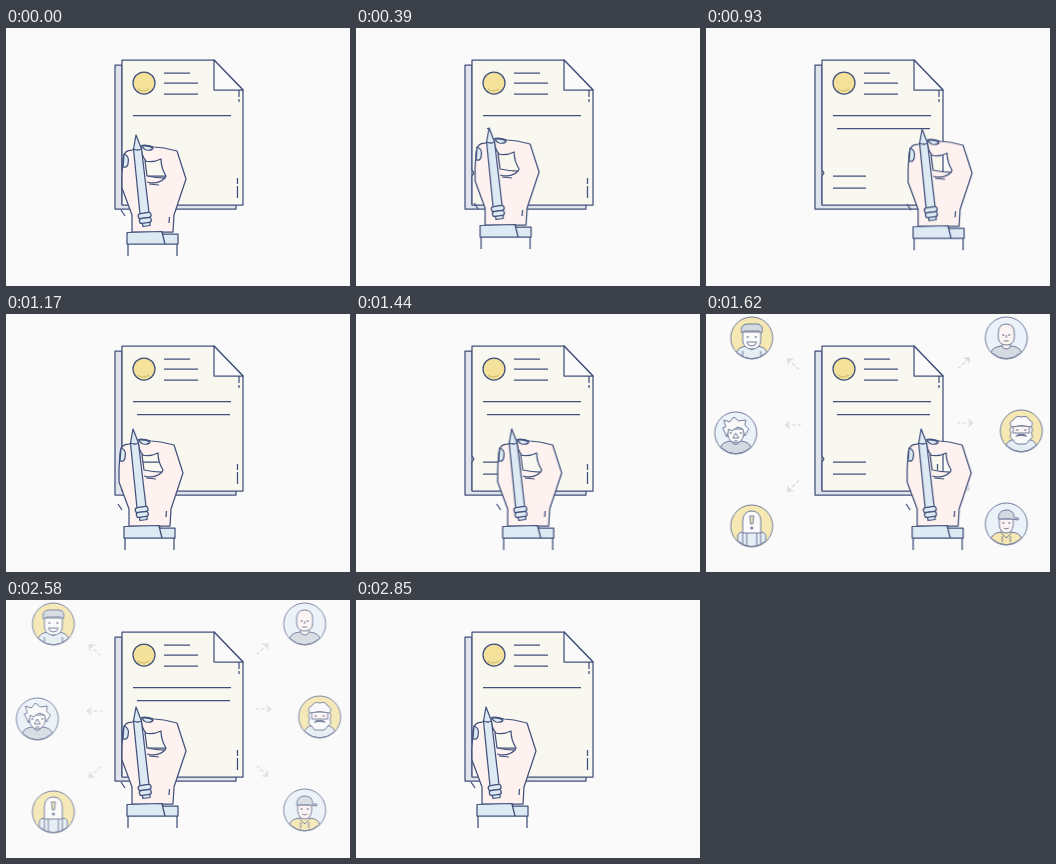
These frames come from a looping animation (344x258 px, 3.6 s). An HTML page:

```html
<!DOCTYPE html>
<html lang="en">
<head>
<meta charset="utf-8">
<title>Signing a document</title>
<style>
  html, body { margin: 0; width: 100%; height: 100%; overflow: hidden; background: #fafafa; }
  svg { display: block; width: 100vw; height: 100vh; }
  .ink { stroke: #42517c; stroke-width: 1.25; stroke-linejoin: round; fill: none; }
  .ink .paper { fill: #f8f8f0; }
  .ink .back { fill: #e1e4ec; }
  .ink .gold { fill: #f5e29a; }
  .ink .blue { fill: #e6eff8; }
  .ink .steel { fill: #deeaf3; }
  .ink .skin { fill: #fdf2ef; }
  .ink .white { fill: #fafafa; }
  .ink .grey { fill: #c9cfda; }
  .ink .dark { fill: #42517c; stroke: none; }
  .thin { stroke-width: 1; }
  .arrow { stroke: #c6c9cf; stroke-width: 1.2; fill: none; }
  .dash { stroke-dasharray: 4 2; }
</style>
</head>
<body>
<svg viewBox="0 0 344 258">
  <g class="ink">
    <path class="back" d="M116 37H109V181H230V176H116Z"/>
    <path class="paper" d="M116 32H208L237 62V177H116V148L118 145L116 142Z"/>
    <path class="white" d="M208 32V62H237Z"/>
    <path d="M233 62V69M233 71V74M231.500 150V156M231.500 158V170"/>
    <circle class="gold" cx="138" cy="55" r="11"/>
    <path class="thin" d="M132 61Q137 65 143 61" stroke="#c9b56d"/>
    <path d="M158 45H184M158 55H192M158 66H192M127 87.500H225M127 148H160M127 160H160"/>
    <path id="line" d="M131 100.500H224" stroke-dasharray="93 100"/>
  </g>

  <g id="left"></g>
  <g id="right"></g>

  <g id="hand" class="ink">
    <path class="skin" fill-rule="evenodd" d="M-4 15C-10 15-12 18-13 24L-14 40V53L-4 80V97H37L38 80L50 44L41 16L28 13L18 12Q8 9 5 11Z
      M9 26Q17 28 25 24Q25 33 30 41L29 43Q20 43 11 41Z"/>
    <path d="M29 43Q22 50 11 47M13 49L23 50M33.500 82L33 88M-15 75L-11 81M5 12Q6 22 10 26"/>
    <path class="steel" d="M6 11Q12 10 17 13Q16 16 10 15Q7 14 6 11Z"/>
    <path class="steel" d="M-12 19Q-6 21-8 29Q-9 33-13 32Z"/>
    <path class="steel" d="M0 0L-2.500 14L4 79L13 77.500L5.500 14Z"/>
    <path d="M-2.500 14Q2 16 5.500 14"/>
    <path class="steel" d="M6 87L7 91.500L14 90.500V86Z"/>
    <g transform="rotate(-8 9 83)">
      <rect class="steel" x="2.500" y="78" width="13" height="5" rx="2.500"/>
      <rect class="steel" x="3" y="83" width="12" height="5" rx="2.500"/>
    </g>
    <path class="white" stroke="none" d="M-8 109H41V121H-8Z"/>
    <path d="M-8 121V109M41 109V121"/>
    <path class="steel" d="M-9 97.500L26 96.500L27 99H42V109H-9Z"/>
    <path d="M26 97L29 109"/>
  </g>
</svg>
<script>
const LOOP = 3600, STEP = 30;
const $ = id => document.getElementById(id);

const p = (d, cls = '') => `<path class="${cls}" d="${d}"/>`;
const avatar = (x, y, tone, art) =>
  `<g class="ink thin" transform="translate(${x} ${y})"><circle class="${tone}" r="21"/>${art}</g>`;
const arrow = (x, y, turn, len) =>
  `<g class="arrow" transform="translate(${x} ${y}) rotate(${turn})">` +
  p(`M0 0H${-len}`, 'dash') + p('M-4 -3.500L0 0L-4 3.500') + '</g>';

const eyes = (x, y) => `<circle class="dark" cx="${-x}" cy="${y}" r=".9"/><circle class="dark" cx="${x}" cy="${y}" r=".9"/>`;
const bust = cls => p('M-15 14.500Q-14 9-5 8H5Q14 9 15 14.500Q0 27-15 14.500Z', cls);

const capMan = bust('steel') + p('M-5 8L0 12L5 8M-9 13V18M9 13V18') +
  p('M-9-6V3Q-8 11 0 11Q8 11 9 3V-6Z', 'white') +
  p('M-10-5Q-12-14-4-14H6Q12-13 10-5L7-7H-7Z', 'grey') +
  eyes(4, -1) + p('M-5 4H5Q4 8 0 8Q-4 8-5 4Z', 'white');
const baldMan = bust('grey') + p('M-4 4V9Q0 13 4 9V4', 'skin') +
  p('M-8-5Q-8-14 0-14Q8-14 8-5V0Q7 7 0 7Q-7 7-8 0Z', 'skin') +
  eyes(3, -3) + p('M-2.500 3H2.500M0-3V0');
const spikyMan = bust('grey') + p('M-4 6V9Q0 14 4 9V6', 'white') +
  p('M-8-4V2Q-6 10 0 10Q6 10 8 2V-4Z', 'white') +
  p('M-9 4L-13-5L-10-6L-12-13L-6-11L-2-16L3-12L10-13L9-8L13-4L9 3L7-4L2-6L-4-2L-7-4Z', 'white') +
  p('M0 0L-3 5H3Z') + eyes(5, 0) + p('M-2 8H2');
const beardMan = bust('steel') +
  p('M-9-5Q-13-2-10 2Q-13 7-8 9Q-6 14 0 13Q6 14 8 9Q13 7 10 2Q13-2 9-5Z', 'white') +
  p('M-8-5V2H8V-5Z', 'skin') +
  p('M-10-4Q-13-9-8-11Q-5-16 0-14Q6-16 8-11Q13-9 10-4Q0-7-10-4Z', 'white') +
  eyes(4, -1) + p('M-6 6Q-4 2 0 3Q4 2 6 6Q0 4-6 6Z', 'dark');
const hooded = p('M-14 15V9Q-13 6-9 6H9Q13 6 14 9V15Q0 26-14 15Z', 'steel') +
  p('M-9 7V-6Q-8-15 0-15Q8-15 9-6V7Z', 'white') +
  p('M-5 7V19M5 7V19M-9 7V18M9 7V18') +
  p('M-2-10H2L1-2H-1Z', 'gold') + '<circle class="dark" cy="2" r="1.500"/>';
const hoodieMan = bust('gold') + p('M-6 8L0 14L6 8M-4 12V18M4 12V18') +
  p('M-7-5V1Q-6 9 0 9Q6 9 7 1V-5Z', 'skin') +
  p('M-8-5Q-8-14 0-14Q8-14 8-6H12V-4Q4-6-8-5Z', 'grey') +
  eyes(3, -1) + p('M-2.500 4Q0 6 2.500 4');

$('left').innerHTML =
  avatar(42, 24, 'gold', capMan) + avatar(26, 119, 'blue', spikyMan) + avatar(42, 212, 'gold', hooded) +
  arrow(78, 45, 223, 15) + arrow(76, 111, 180, 15) + arrow(78, 177, 137, 15);
$('right').innerHTML =
  avatar(304, 24, 'blue', baldMan) + avatar(319, 117, 'gold', beardMan) + avatar(304, 210, 'blue', hoodieMan) +
  arrow(267, 44, -43, 15) + arrow(270, 109, 0, 15) + arrow(267, 176, 43, 15);

const glide = 'cubic-bezier(.5,0,.3,1)';
const tracks = [];

// Rows are [ms, value, easing to the next row]; the ends hold.
function track(id, prop, rows, show = v => v) {
  const first = rows[0], last = rows[rows.length - 1];
  const keys = [[0, first[1]], ...rows, [LOOP, last[1]]].map(([ms, v, easing = 'linear']) =>
    ({ offset: ms / LOOP, [prop]: show(v), easing }));
  const a = $(id).animate(keys, { duration: LOOP, iterations: Infinity });
  a.pause();
  tracks.push(a);
}

track('hand', 'transform', [
  [30, [130, 107]], [90, [131, 100]],
  [330, [131, 100], glide], [840, [224, 100]],
  [870, [224, 100], 'ease-in-out'], [1170, [127, 115]],
  [1290, [127, 115], glide], [1720, [219.5, 115]],
  [2220, [219.5, 115], glide], [2580, [130, 107]]
], ([x, y]) => `translate(${x}px, ${y}px)`);

track('line', 'strokeDashoffset', [[330, 93, glide], [840, 0]], v => v + 'px');
track('line', 'opacity', [[330, 0], [331, 1], [2760, 1], [2850, 0]]);

const shift = [[1440, 16], [1620, 3.7], [1695, -3], [1770, 0], [2490, 0], [2760, 16]];
const fade = [[1440, 0], [1680, 1], [2490, 1], [2760, 0]];
for (const [id, dir] of [['left', 1], ['right', -1]]) {
  track(id, 'transform', shift, v => `translate(${v * dir}px, 0px)`);
  track(id, 'opacity', fade);
}

let start;
function draw(now) {
  start ??= now;
  const t = Math.floor((now - start) % LOOP / STEP) * STEP;
  for (const a of tracks) a.currentTime = t;
  requestAnimationFrame(draw);
}
requestAnimationFrame(draw);
</script>
</body>
</html>
```
